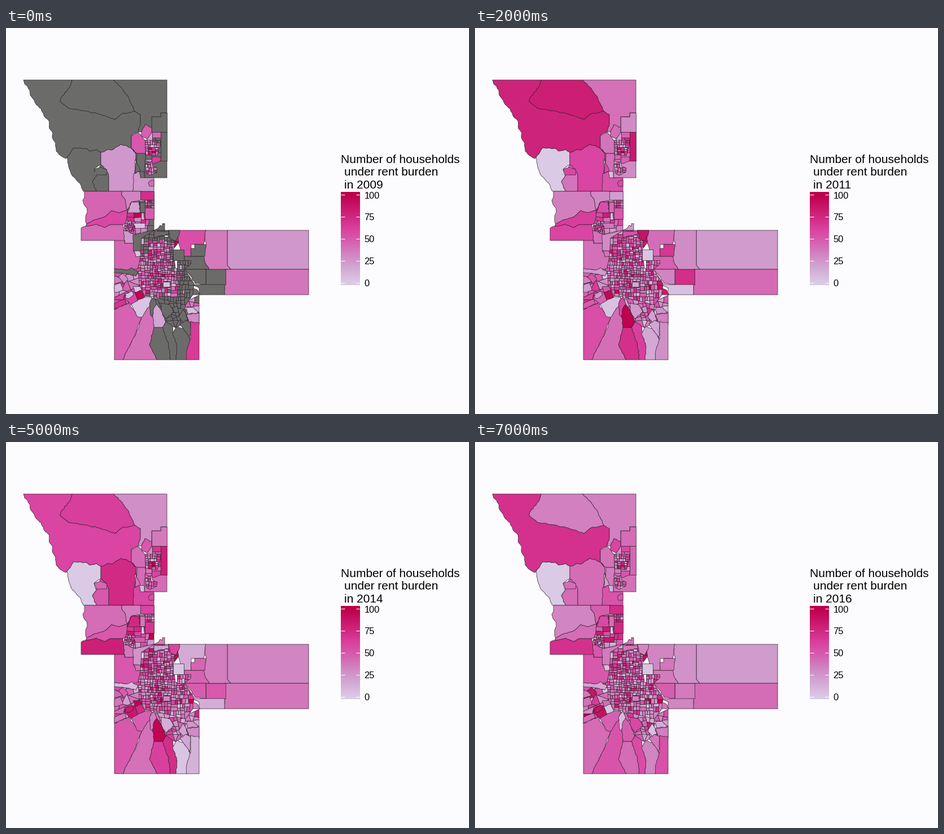
Animation, 820 px wide and 683 px high, one loop 8000 ms. Source, as a matplotlib script:

```python
import math
import random

import matplotlib.pyplot as plt
import numpy as np
from matplotlib.animation import FuncAnimation
from matplotlib.collections import PolyCollection

W, H, DPI = 820, 683, 100
YEARS = range(2009, 2017)
NA = np.array([107, 108, 105]) / 255
STOPS = [0, 25, 50, 60, 75, 100]
RGB = np.array([(218, 202, 230), (207, 151, 203), (215, 88, 172),
                (218, 68, 162), (208, 40, 130), (190, 0, 75)]) / 255

rng = random.Random(12)
shapes, series = [], []


def color(v):
    if v is None:
        return NA
    return np.array([np.interp(v, STOPS, RGB[:, k]) for k in range(3)])


def rough_edge(a, b):
    """Points from a up to b; slanted edges wobble the same in both directions."""
    dx, dy = b[0] - a[0], b[1] - a[1]
    n = int(math.hypot(dx, dy) / 3.5)
    if dx == 0 or dy == 0 or n < 2:
        return [a]
    p, q = sorted((a, b))
    r = random.Random(f"{p}{q}")
    ux, uy = q[0] - p[0], q[1] - p[1]
    size = math.hypot(ux, uy)
    pts = [p]
    for i in range(1, n):
        off = r.uniform(-0.9, 0.9) / size
        pts.append((p[0] + ux * i / n - uy * off, p[1] + uy * i / n + ux * off))
    pts.append(q)
    if p != a:
        pts.reverse()
    return pts[:-1]


def rough(pts):
    out = []
    for a, b in zip(pts, pts[1:] + pts[:1]):
        out += rough_edge(a, b)
    return out


def add(pts, vals):
    """vals: 2009, 2010, 2012, 2013, 2014, 2016; the gaps are averaged."""
    a, b, c, d, e, f = vals
    shapes.append(pts)
    series.append([a, b, (b + c) / 2, c, d, e, (e + f) / 2, f])


def tract(pts, *vals):
    if len(vals) == 5:
        vals = (None,) + vals
    add(rough(pts), vals)


def box(x0, y0, x1, y1, *vals):
    tract([(x0, y0), (x1, y0), (x1, y1), (x0, y1)], *vals)


def area_of(p):
    return abs(sum(a[0] * b[1] - b[0] * a[1] for a, b in zip(p, p[1:] + p[:1]))) / 2


def cut(p, c, n):
    """The part of polygon p on the side of point c that n points away from."""
    out = []
    for a, b in zip(p, p[1:] + p[:1]):
        da = (a[0] - c[0]) * n[0] + (a[1] - c[1]) * n[1]
        db = (b[0] - c[0]) * n[0] + (b[1] - c[1]) * n[1]
        if da <= 0:
            out.append(a)
        if da * db < 0:
            t = da / (da - db)
            out.append((a[0] + t * (b[0] - a[0]), a[1] + t * (b[1] - a[1])))
    return out


def patch(pts, size, tilt=0.0, gray=lambda x, y: 0.0, mean=43, spread=17):
    """Fill a polygon with random small tracts of about the given area."""
    xs, ys = zip(*pts)
    x, y = (min(xs) + max(xs)) / 2, (min(ys) + max(ys)) / 2
    goal = size(x, y) if callable(size) else size
    if area_of(pts) < goal * rng.uniform(0.9, 1.9):
        base = rng.gauss(mean, spread)
        vals = [min(100, max(0, base + rng.gauss(0, 11))) for _ in range(6)]
        if rng.random() < gray(x, y):
            vals[0] = None
        add(pts, vals)
        return
    w, h = max(xs) - min(xs), max(ys) - min(ys)
    ang = rng.uniform(-tilt, tilt) + (0 if w > h else math.pi / 2)
    c = (x + w * rng.uniform(-0.16, 0.16), y + h * rng.uniform(-0.16, 0.16))
    n = (math.cos(ang), math.sin(ang))
    parts = [cut(pts, c, n), cut(pts, c, (-n[0], -n[1]))]
    for part in parts:
        if len(part) > 2 and area_of(part) > 2:
            patch(part, size, tilt, gray, mean, spread)


# Northern county
west = [(31, 92), (33, 99), (38, 103), (42, 110), (43, 119), (50, 128), (54, 136),
        (62, 143), (67, 155), (76, 164), (77, 178), (83, 186), (82, 194),
        (88, 204), (89, 218), (97, 226), (106, 231)]
ridge = [(108, 229), (120, 212), (142, 213), (148, 218), (160, 215), (168, 220)]
dome = [(168, 220), (178, 216), (190, 215), (203, 206), (213, 208), (224, 215), (230, 224)]
divide = [(228, 147), (205, 152), (193, 162), (165, 152), (135, 146), (110, 142),
          (96, 130), (98, 123), (114, 103), (117, 92)]

tract([(117, 92)] + west + ridge + dome[1:] +
      [(232, 222), (222, 213), (222, 190), (234, 184), (238, 170), (238, 153)] + divide[:-1],
      84, 72, 66, 60, 70)
tract([(190, 92), (203, 104), (217, 122), (221, 132)] + divide, 100, 62, 72, 63, 34)
tract([(190, 92), (285, 92), (285, 150), (274, 150), (274, 157), (258, 157), (258, 178),
       (246, 171), (240, 184), (234, 184), (238, 170), (238, 153), (228, 147),
       (221, 132), (217, 122), (203, 104)], 52, 28, 26, 28, 34)
tract([(258, 157), (274, 157), (274, 150), (285, 150), (285, 184), (258, 184)],
      33, 27, 36, 37, 42)
tract([(222, 190), (234, 185), (240, 190), (247, 200), (247, 222), (232, 222), (222, 213)],
      50, 42, 36, 45, 42, 40)
tract([(240, 184), (246, 171), (258, 176), (258, 190), (249, 196), (240, 192)],
      47, 50, 36, 44, 50, 60)
tract([(228, 222), (247, 222), (250, 240), (247, 265), (236, 265), (228, 256), (231, 240)],
      42, 40, 38, 42, 36)
tract([(222, 213), (232, 222), (231, 238), (238, 254), (228, 256), (231, 236), (230, 224)],
      76, 40, 38, 40, 22)
tract([(247, 222), (265, 222), (265, 235), (285, 235), (285, 265), (245, 265)],
      28, 32, 36, 42, 40)
patch([(258, 184), (274, 184), (274, 235), (262, 240), (247, 235), (247, 200)], 130,
      gray=lambda x, y: 0.8)
patch([(246, 198), (273, 198), (273, 208), (268, 226), (248, 224)], 24,
      gray=lambda x, y: 0.12, mean=46)
box(274, 184, 285, 235, 86, 82, 85, 80, 45)
patch([(247, 241), (258, 236), (260, 245), (268, 248), (267, 255), (255, 261), (248, 257)],
      27, gray=lambda x, y: 0.1)
tract([(234, 254), (245, 254), (245, 265), (238, 269), (235, 262)], 5, 5, 8, 8, 12)

tract(ridge + [(168, 242), (156, 250), (160, 262), (153, 272), (160, 289), (137, 289),
               (131, 275), (118, 262), (112, 249)], 0, 0, 0, 0, 0)
tract([(168, 242), (182, 251), (182, 289), (160, 289), (153, 272), (160, 262)],
      40, 38, 50, 50, 42)
tract([(156, 250), (168, 246), (179, 251), (178, 260), (160, 260)], 44, 72, 56, 44, 42)
tract(dome + [(228, 256), (225, 289), (182, 289), (182, 262), (178, 250), (168, 242)],
      25, 60, 60, 60, 74, 42)
tract([(226, 258), (236, 254), (238, 265), (262, 265), (262, 289), (225, 289)],
      25, 28, 76, 66, 58, 52)
tract([(252, 274), (258, 269), (262, 269), (262, 280), (254, 280)], 42, 45, 68, 62, 55, 50)

# Foothill county
brow = [(143, 347), (155, 340), (170, 336), (180, 330), (187, 323), (200, 327), (215, 322)]
foot = [(141, 351), (160, 347), (175, 353), (185, 348), (207, 348)]
tract([(139, 289), (205, 289), (205, 296), (211, 303), (215, 322)] + brow[-2::-1] +
      [(141, 343), (141, 333), (144, 326), (143, 318), (138, 312), (136, 305), (139, 300)],
      45, 42, 27, 46, 42, 32)
tract(brow + [(216, 345), (207, 348)] + foot[-2::-1], 58, 63, 63, 58, 50, 42)
tract([(133, 354)] + foot + [(210, 362), (210, 381), (192, 376), (133, 376)],
      42, 48, 72, 74, 80, 70)
patch([(215, 322), (222, 308), (262, 304), (262, 358), (240, 362), (225, 366), (212, 362)],
      85, 0.15, gray=lambda x, y: 0.15)
tract([(205, 289), (240, 289), (240, 304), (222, 308), (215, 322), (211, 303), (205, 296)],
      33, 33, 28, 27, 35, 48)
box(238, 289, 262, 304, 72, 5, 38, 82, 60, 72)
tract([(222, 308), (236, 308), (237, 327), (215, 327)], 20, 58, 52, 74, 75, 58)
box(237, 308, 246, 326, 42, 45, 40, 38, 42)
patch([(246, 304), (262, 304), (262, 318), (246, 318)], 15, gray=lambda x, y: 0.3)
box(246, 318, 262, 338, 48, 50, 50, 55, 68, 75)
box(226, 345, 246, 354, 5, 33, 45, 45, 50, 85)
patch([(213, 340), (221, 342), (228, 350), (230, 364), (213, 362), (209, 352)], 17, 0.5)
tract([(208, 357), (225, 364), (226, 381), (210, 381)], 24, 40, 42, 72, 38, 50)

# Western and southern suburbs
tract([(192, 376), (210, 376), (210, 381), (226, 381), (226, 396), (238, 405), (234, 425),
       (228, 430), (192, 426)], 45, 36, 45, 48, 50, 50)
tract([(225, 366), (245, 362), (262, 358), (250, 385), (240, 395), (226, 394)],
      30, 30, 27, 26, 36)
tract([(226, 394), (237, 395), (240, 404), (230, 405)], 3, 40, 38, 35, 40, 5)
patch([(192, 432), (232, 426), (240, 455), (230, 468), (217, 487), (192, 498)], 120, 0.5)
tract([(192, 426), (215, 428), (222, 424), (234, 432), (230, 439), (212, 435), (192, 433)],
      25, 22, 12, 8, 18)
tract([(199, 440), (207, 434), (216, 445), (209, 453)], 30, 60, 45, 72, 48, 88)
tract([(192, 455), (203, 451), (207, 464), (192, 468)], 10, 5, 42, 32, 38, 40)
tract([(225, 458), (240, 456), (243, 466), (228, 468)], 4, 5, 95, 95, 97, 42)
tract([(192, 487), (210, 480), (213, 488), (192, 498)], 68, 50, 48, 40, 38, 42)

tract([(192, 498), (217, 487), (228, 502), (240, 512), (228, 545), (215, 570), (207, 587),
       (192, 587)], 46, 50, 60, 42, 50, 42)
tract([(207, 587), (215, 570), (235, 530), (240, 512), (255, 488), (262, 510), (262, 530),
       (254, 560), (268, 587)], 40, 48, 34, 62, 40, 52)
tract([(215, 480), (233, 480), (245, 476), (258, 476), (255, 490), (240, 512), (232, 510),
       (225, 495)], 3, 5, 3, 60, 47, 47)
tract([(209, 478), (215, 468), (228, 467), (234, 482), (222, 489)], 58, 45, 45, 82, 85, 90)
tract([(212, 470), (224, 466), (226, 472), (217, 479), (211, 477)], 5, 5, 45, 76, 82, 88)
tract([(228, 468), (241, 464), (246, 476), (233, 481)], 97, 92, 97, 97, 74, 3)


def south_gray(x, y):
    return 0.95 if x < 318 else 0.45


patch([(258, 478), (318, 484), (342, 473), (342, 525), (322, 520), (300, 530), (285, 524),
       (275, 500)], 75, 0.5, south_gray, mean=32, spread=13)
tract([(258, 492), (265, 487), (275, 500), (283, 520), (277, 530), (262, 530)],
      18, 100, 97, 97, 97, 48)
tract([(254, 488), (262, 476), (267, 488), (261, 498), (260, 512), (256, 508)],
      95, 25, 60, 35, 8)
tract([(275, 487), (290, 490), (297, 502), (283, 515), (275, 500)], 10, 38, 35, 14, 58)
tract([(306, 512), (314, 498), (322, 515), (315, 522)], 24, 15, 4, 20, 5)
tract([(320, 495), (332, 494), (340, 504), (322, 506)], 6, 25, 30, 28, 25, 15)
tract([(320, 507), (342, 504), (342, 523), (324, 520)], 30, 35, 35, 30, 30, 35)
tract([(262, 530), (277, 530), (288, 560), (291, 587), (268, 587), (254, 560)],
      62, 80, 50, 62, 42)
tract([(277, 530), (284, 520), (295, 528), (298, 548), (303, 565), (301, 587), (291, 587),
       (288, 560)], 66, 58, 74, 72, 56)
tract([(295, 540), (303, 528), (315, 532), (326, 550), (325, 570), (319, 587), (301, 587),
       (303, 565), (298, 548)], 30, 3, 3, 3, 32)
tract([(308, 524), (318, 517), (327, 521), (326, 550), (315, 534)], 16, 20, 30, 18, 38)
tract([(327, 519), (342, 522), (342, 587), (319, 587), (321, 568), (327, 550)],
      65, 28, 28, 13, 12, 54)

# Eastern plains
tract([(392, 358), (536, 358), (536, 427), (398, 427), (392, 420)], 25, 27, 18, 26, 32, 23)
tract([(352, 358), (392, 358), (392, 420), (398, 427), (360, 427), (354, 418), (348, 405),
       (354, 385)], 36, 27, 32, 32, 35, 27)
tract([(304, 358), (354, 358), (350, 383), (328, 383), (328, 404), (315, 404), (305, 380)],
      55, 48, 35, 28, 15, 32)
tract([(316, 404), (350, 404), (354, 418), (360, 427), (316, 427)], 46, 46, 42, 45, 36)
tract([(328, 390), (334, 390), (334, 383), (354, 383), (352, 404), (327, 404)],
      78, 56, 70, 45, 38)
tract([(388, 427), (536, 427), (536, 472), (387, 472)], 38, 42, 43, 35, 38, 42)
box(354, 427, 389, 454, 98, 45, 58, 50, 36)
tract([(330, 454), (387, 454), (387, 472), (342, 472), (342, 460)], 5, 5, 5, 14, 32)
tract([(317, 427), (354, 427), (354, 454), (335, 452), (326, 438)], 18, 48, 48, 48, 48)


# City core
def core_size(x, y):
    d = math.hypot((x - 272) / 55, (y - 422) / 65)
    return 20 + 26 * d * d


def core_gray(x, y):
    if y > 474 or y < 377:
        return 0.9
    if x > 303 and y > 427:
        return 0.85
    if (x > 290 and y < 428) or (x < 250 and y < 396):
        return 0.65
    return 0.06


patch([(240, 372), (262, 358), (304, 358), (305, 380), (296, 392), (300, 425), (317, 428),
       (333, 452), (331, 472), (318, 490), (290, 483), (262, 476), (246, 474), (236, 455),
       (234, 425), (238, 405)], core_size, 0.06, core_gray, mean=45, spread=19)
patch([(303, 411), (327, 411), (327, 418), (316, 427), (303, 427)], 36, 0,
      lambda x, y: 0.5)
box(296, 392, 315, 411, 3, 3, 3, 3, 3)
tract([(331, 461), (338, 463), (344, 472), (331, 472)], 86, 80, 25, 35, 40)
tract([(288, 358), (308, 358), (306, 368), (300, 377), (290, 373)], 80, 97, 38, 60, 32)
tract([(262, 360), (288, 360), (288, 366), (275, 367), (262, 370)], 88, 15, 10, 20, 38)
tract([(262, 358), (270, 354), (273, 349), (277, 351), (277, 346), (281, 346), (281, 358)],
      35, 12, 20, 35, 38)
box(278, 449, 290, 458, 5, 5, 30, 36, 32, 35)

fills = [np.array([color(s[k]) for s in series]) for k in range(len(YEARS))]

# The small margin keeps rounding from losing a pixel
fig = plt.figure(figsize=((W + 0.01) / DPI, (H + 0.01) / DPI), dpi=DPI, facecolor="#fcfcfe")
ax = fig.add_axes([0, 0, 1, 1])
ax.axis("off")

# Legend
ramp = np.array([[color((451 - y) / 1.55)] for y in np.linspace(291, 455, 164)])
ax.imshow(ramp, extent=(593, 626, 455, 291), aspect="auto", interpolation="bilinear")
for v in (0, 25, 50, 75, 100):
    y = 451 - 1.555 * v
    for x in (593, 619.5):
        ax.plot([x, x + 6.5], [y, y], color="white", lw=0.8, solid_capstyle="butt")
    ax.text(634.5, y + 6, str(v), family="Liberation Sans", size=16.4 * 0.72)


def title(x, y, s):
    return ax.text(x, y, s, family="Liberation Sans", size=20.9 * 0.72)


title(593, 238.5, "Number of households")
title(599, 261, "under rent burden")
year = title(599, 283.5, "in 2009")

tracts = PolyCollection(shapes, facecolors=fills[0], edgecolors="#2f202c", linewidths=0.5)
ax.add_collection(tracts, autolim=False)
ax.set_xlim(0, W)
ax.set_ylim(H, 0)


def draw(k):
    tracts.set_facecolor(fills[k])
    year.set_text(f"in {YEARS[k]}")
    return tracts, year


anim = FuncAnimation(fig, draw, frames=len(YEARS), interval=1000, repeat=True)
plt.show()
```
